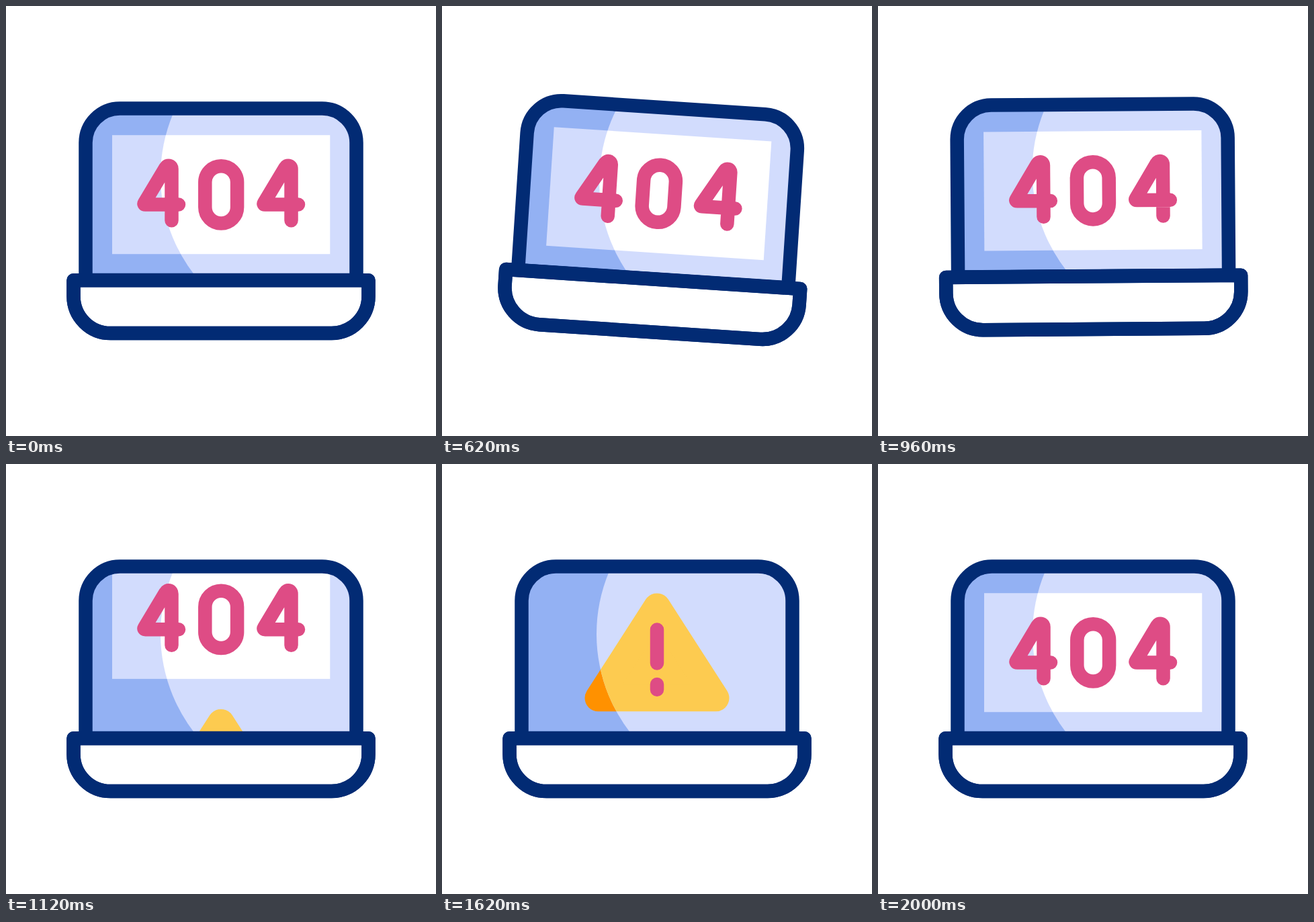
These frames come from a looping animation (640 by 640 pixels, 2400 ms). An HTML page:

```html
<!DOCTYPE html>
<html lang="en">
<head>
<meta charset="utf-8">
<title>404 laptop</title>
<style>
  html, body { margin: 0; width: 100%; height: 100%; overflow: hidden; background: #fff; }
  svg { display: block; width: 100vw; height: 100vh; }
  .navy { fill: none; stroke: #022b74; stroke-width: 20.5; stroke-linejoin: round; }
  .ink { fill: none; stroke: #de4c85; stroke-width: 20.5; stroke-linecap: round; stroke-linejoin: round; }
  .blue { fill: #93b1f3; }
  .pale { fill: #d2dcfd; }
  .white { fill: #fff; }
  .orange { fill: #ff9100; stroke: #ff9100; }
  .yellow { fill: #fdcb50; stroke: #fdcb50; }
</style>
</head>
<body>
<svg viewBox="0 0 640 640">
  <defs>
    <path id="lid" d="M118.5 408V203.5a51 51 0 0 1 51-51H470.5a51 51 0 0 1 51 51V408z"/>
    <path id="notch" d="M265 417H375V419.5a28 28 0 0 1-28 28H293a28 28 0 0 1-28-28z"/>
    <rect id="panel" x="158" y="192.2" width="324.3" height="177"/>
    <path id="sign" d="M320 214L407.5 349.9H232.5z" stroke-width="40" stroke-linejoin="round"/>
    <path id="four" d="M246.5 319.2V242.5c0-5.5-6.5-6.5-9-2L206 293q-1.5 2.5 1.5 2.5H257"/>
    <clipPath id="screen"><use href="#lid"/></clipPath>
    <clipPath id="glow"><circle cx="470" cy="253" r="240"/></clipPath>
    <clipPath id="inNotch"><use href="#notch"/></clipPath>
  </defs>
  <g id="laptop">
    <g clip-path="url(#screen)">
      <rect class="blue" x="100" y="140" width="440" height="270"/>
      <use href="#panel" class="pale page"/>
      <use href="#sign" class="orange alert"/>
      <g clip-path="url(#glow)">
        <rect class="pale" x="100" y="140" width="440" height="270"/>
        <use href="#panel" class="white page"/>
        <use href="#sign" class="yellow alert"/>
      </g>
      <g class="ink page">
        <use href="#four"/>
        <rect x="296.3" y="238.2" width="47.8" height="85.2" rx="23.9"/>
        <use href="#four" x="178"/>
      </g>
      <path class="ink alert" d="M320 248V298M320 329.5V337.3"/>
    </g>
    <use href="#lid" class="navy"/>
    <path id="base" class="white" d="M100.5 408.3H539.5V432a55 55 0 0 1-55 55H155.5a55 55 0 0 1-55-55z"/>
    <use href="#notch" class="blue"/>
    <g clip-path="url(#inNotch)"><use href="#panel" class="pale page"/></g>
    <use href="#base" class="navy" style="fill:none"/>
    <path class="navy" d="M100.5 408.3H539.5V432a55 55 0 0 1-55 55H155.5a55 55 0 0 1-55-55z"/>
  </g>
</svg>
<script>
  const LOOP = 2400, STEP = 20;

  // [time in ms, value]; a repeated time is a hard jump
  const tilt = [[200, 0], [400, -4], [600, 4], [800, -4], [1000, 0]];
  const lift = [[600, 0], [800, -57.5], [1000, 0]];
  const page = [[1000, 0], [1400, -228.5], [1500, -228.5], [1500, 258], [1600, 258], [2000, 0]];
  const alert = [[1000, 218], [1400, 0], [1600, 0], [2000, -218]];

  const ease = p => p * p * (3 - 2 * p);

  function at(keys, t) {
    if (t <= keys[0][0]) return keys[0][1];
    for (let i = 1; i < keys.length; i++) {
      const [t0, a] = keys[i - 1], [t1, b] = keys[i];
      if (t < t1) return a + (b - a) * ease((t - t0) / (t1 - t0));
    }
    return keys[keys.length - 1][1];
  }

  const laptop = document.getElementById('laptop');
  const pages = document.querySelectorAll('.page');
  const alerts = document.querySelectorAll('.alert');
  const shift = (parts, y) => parts.forEach(el => el.setAttribute('transform', `translate(0 ${y})`));

  function draw(t) {
    laptop.setAttribute('transform', `translate(0 ${at(lift, t)}) rotate(${at(tilt, t)} 320 320)`);
    shift(pages, at(page, t));
    shift(alerts, at(alert, t));
  }

  const start = performance.now();
  function tick() {
    const t = (performance.now() - start) % LOOP;
    draw(Math.floor(t / STEP) * STEP);
    requestAnimationFrame(tick);
  }
  tick();
</script>
</body>
</html>
```
